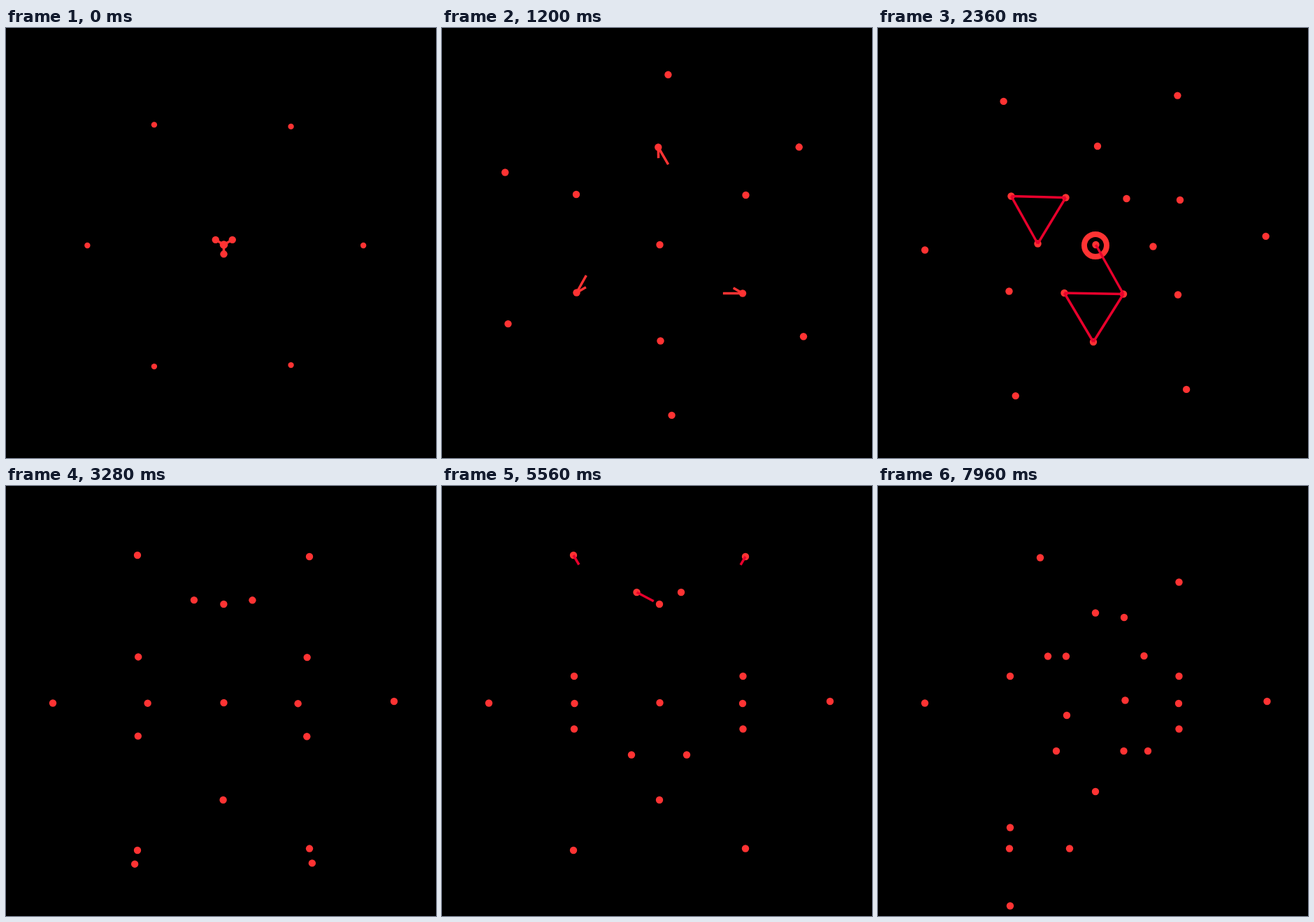
Write an HTML page that moves like this. It is 615 px wide and 615 px high and loops after 8 s.

```html
<!DOCTYPE html>
<html lang="en">
<head>
<meta charset="utf-8">
<title>Red dots</title>
<style>
  html, body { margin: 0; width: 100%; height: 100%; overflow: hidden; background: #000; }
  svg { display: block; width: 100vw; height: 100vh; }
</style>
</head>
<body>
<svg id="stage" viewBox="0 0 615 615"></svg>
<script>
const LOOP = 8000, RED = '#ff3333', CRIMSON = '#e8002c';
const CX = 311, CY = 310.5;
const stage = document.getElementById('stage');
const dots = [], lines = [];

const clamp = v => Math.max(0, Math.min(1, v));
const span = (t, a, b) => clamp((t - a) / (b - a));
const smooth = k => k * k * (3 - 2 * k);
const easeOut = k => 1 - (1 - k) * (1 - k);
const mix = (a, b, k) => a + (b - a) * k;
const mixPoint = (p, q, k) => [mix(p[0], q[0], k), mix(p[1], q[1], k)];

function add(tag, attrs) {
  const el = document.createElementNS('http://www.w3.org/2000/svg', tag);
  set(el, attrs);
  stage.append(el);
  return el;
}
function set(el, attrs) {
  for (const name in attrs) el.setAttribute(name, attrs[name]);
}

// A dot starts at a point (or a function of time) and is carried on by moves.
class Dot {
  constructor(start, born = 0, radius = () => 5.2) {
    this.start = typeof start === 'function' ? start : () => start;
    this.born = born;
    this.radius = radius;
    this.moves = [];
    this.el = add('circle', { fill: RED });
    dots.push(this);
  }
  to(a, b, x, y, ease = smooth) {
    this.moves.push({ a, b, p: [x, y], ease });
    return this;
  }
  at(t) {
    let p = this.start(t);
    for (const m of this.moves) {
      if (t > m.a) p = mixPoint(p, m.p, m.ease(span(t, m.a, m.b)));
    }
    return p;
  }
  draw(t) {
    const [cx, cy] = this.at(t);
    set(this.el, { cx, cy, r: t >= this.born ? this.radius(t) : 0 });
  }
}

const ring = add('circle', { cx: 311, cy: 311, fill: 'none', stroke: RED });

// Outer hexagon: swells, then turns by a sixth; each second dot leaves later.
const TAU = 2 * Math.PI;
function orbit(x0, y0, x1, y1, begin) {
  const from = Math.atan2(y0 - CY, x0 - CX);
  const turn = (Math.atan2(y1 - CY, x1 - CX) - from + TAU) % TAU;
  const r0 = Math.hypot(x0 - CX, y0 - CY);
  const place = t => {
    const u = Math.max(0, t - begin) / 702;
    const a = from + turn * (1 - Math.exp(-Math.pow(u, 1.4)));
    const r = mix(r0, 244, easeOut(span(t, 0, 800)));
    return [CX + r * Math.cos(a), CY + r * Math.sin(a)];
  };
  return new Dot(place, 0, t => mix(4.2, 5.2, span(t, 0, 1100)))
    .to(2400, 3380, x1, y1);
}
const br = orbit(511, 311, 434, 518.5, 610);
const bl = orbit(407.5, 482, 188, 521, 743);
const left = orbit(212, 484, 67, 310.5, 610);
const tl = orbit(116.5, 311, 188, 99, 743);
const tr = orbit(212, 138.5, 434, 101, 610);
const right = orbit(407.5, 141, 555, 308, 743);

const core = new Dot([311.5, 310], 0, t => mix(5.8, 5.2, span(t, 0, 900)));

// Inner hexagon: three arms first, then the three between them.
const arm = (x, y, first) => new Dot(first || [311.5, 310], first ? 0 : 240)
  .to(first ? 0 : 240, first ? 820 : 1080, x, y, easeOut);
const up = arm(309.3, 170.5).to(1300, 2340, 314, 169).to(2500, 3500, 311, 169);
const upR = arm(434.5, 239, [323.5, 303]).to(1300, 2340, 432, 246).to(2500, 3500, 430.5, 245);
const lowR = arm(430, 379.5).to(1300, 2340, 429, 381.5).to(2500, 3500, 430.5, 355);
const down = arm(312.5, 447.5, [311.5, 323]).to(1300, 2340, 308, 449).to(2500, 3500, 311, 449);
const lowL = arm(192.5, 378.5).to(1300, 2340, 187.5, 376.5).to(2500, 3500, 189, 355);
const upL = arm(192, 238, [300, 303]).to(1300, 2340, 190.5, 240.5).to(2500, 3500, 189, 245);

// Middle hexagon.
const mid = (x, y) => new Dot([311.5, 310], 1500).to(1500, 2300, x, y, easeOut);
const midUL = mid(268.5, 242.5).to(2500, 3500, 269, 152);
const midUR = mid(355.5, 244).to(2500, 3500, 352, 152);
const midL = mid(228.5, 308.5).to(2500, 3500, 199, 311);
const midR = mid(393.5, 312.5).to(2500, 3500, 421, 311);
const midLL = mid(266.5, 379).to(2500, 3050, 180, 562).to(3050, 3500, 188, 521);
const midLR = mid(351, 380.5).to(2500, 3050, 442, 562).to(3050, 3500, 434, 518.5);

// Gathering towards the sides.
const gather = (dot, x, y) => dot.to(4300, 5500, x, y);
gather(upL, 189, 272);
gather(upR, 430.5, 272);
gather(lowL, 189, 347.5);
gather(lowR, 430.5, 347.5);
gather(midL, 189.5, 311);
gather(midR, 430, 311);
gather(midUL, 278.5, 152);
gather(midUR, 342, 152);
gather(midLL, 271, 384.5);
gather(midLR, 350, 384.5);

// Scattering, in two rounds.
const drift = (dot, x, y) => dot.to(5660, 6760, x, y);
const shift = (dot, x, y) => dot.to(6840, 7940, x, y);
const splitA = new Dot([311, 311], 5700);
const splitB = new Dot([311, 449], 5700);
drift(splitA, 288, 217);
drift(splitB, 386, 448.5);
drift(tl, 260, 191.5);
drift(tr, 434, 170);
drift(midUL, 278.5, 243.5);
drift(midUR, 380.5, 152);
drift(lowL, 269, 345.5);
drift(midLL, 235.5, 379);
drift(midLR, 351.5, 379);
drift(core, 311, 379);
br.to(5760, 6260, 434, 562).to(6260, 6780, 434, 499);

const splitC = new Dot([278.5, 243.5], 6840);
shift(splitC, 243, 243.5);
shift(midUL, 269, 243.5);
shift(splitA, 352, 188);
shift(splitB, 386, 379);
shift(tl, 232, 102.5);
shift(tr, 430.5, 137.5);
shift(up, 311, 181.5);
shift(midUR, 380.5, 243);
shift(core, 353.5, 306.5);
shift(lowL, 270, 328);
shift(midLL, 255, 379);
shift(down, 311, 437);
shift(midL, 189, 488.5);
shift(bl, 188, 518.5);
shift(br, 274, 518.5);
right.to(7600, 7940, 556.5, 308);
new Dot([189, 625], 7600).to(7600, 7950, 189, 600.5);

// A line grows from a to b, then its tail follows towards b.
function link(a, b, grow, wipe, colour = CRIMSON) {
  const el = add('line', { stroke: colour, 'stroke-width': 3.5 });
  lines.push(t => {
    const head = span(t, ...grow), tail = span(t, ...wipe);
    const p = a.at(t), q = b.at(t);
    const [x1, y1] = mixPoint(p, q, tail), [x2, y2] = mixPoint(p, q, head);
    set(el, { x1, y1, x2, y2, visibility: head > tail ? 'visible' : 'hidden' });
  });
}

for (const d of [upL, upR, down]) link(core, d, [-1, 0], [560, 1000], RED);
for (const d of [up, lowL, lowR]) link(core, d, [240, 241], [750, 1258], RED);
[up, lowR, lowL].forEach((d, i, all) =>
  link(d, all[(i + 1) % 3], [1130, 1730], [1730, 2250], RED));

function triangle(a, b, c, begin, end) {
  [[a, b], [b, c], [c, a]].forEach(([p, q], i) =>
    link(p, q, [begin + i * 110, begin + i * 110 + 110], [end + i * 110, end + i * 110 + 110]));
}
triangle(upL, midUL, midL, 1900, 2460);
link(core, midLR, [1900, 2010], [2420, 2530]);
triangle(midLR, midLL, down, 2010, 2530);

link(bl, tr, [3500, 4220], [5080, 5575]);
link(br, tl, [3490, 4223], [5080, 5577]);
link(bl, down, [3450, 3850], [4950, 5350]);
link(br, down, [3450, 3850], [4950, 5350]);
link(up, midUL, [3600, 3900], [5500, 5740]);
link(up, midUR, [3600, 3900], [5220, 5480]);

function render(t) {
  for (const d of dots) d.draw(t);
  for (const draw of lines) draw(t);
  const k = span(t, 2120, 2600);
  set(ring, {
    r: mix(12, 20, k),
    'stroke-width': 16 * Math.min(k, 1 - k)
  });
}

const began = performance.now();
function tick() {
  render((performance.now() - began) % LOOP);
  requestAnimationFrame(tick);
}
tick();
</script>
</body>
</html>
```
